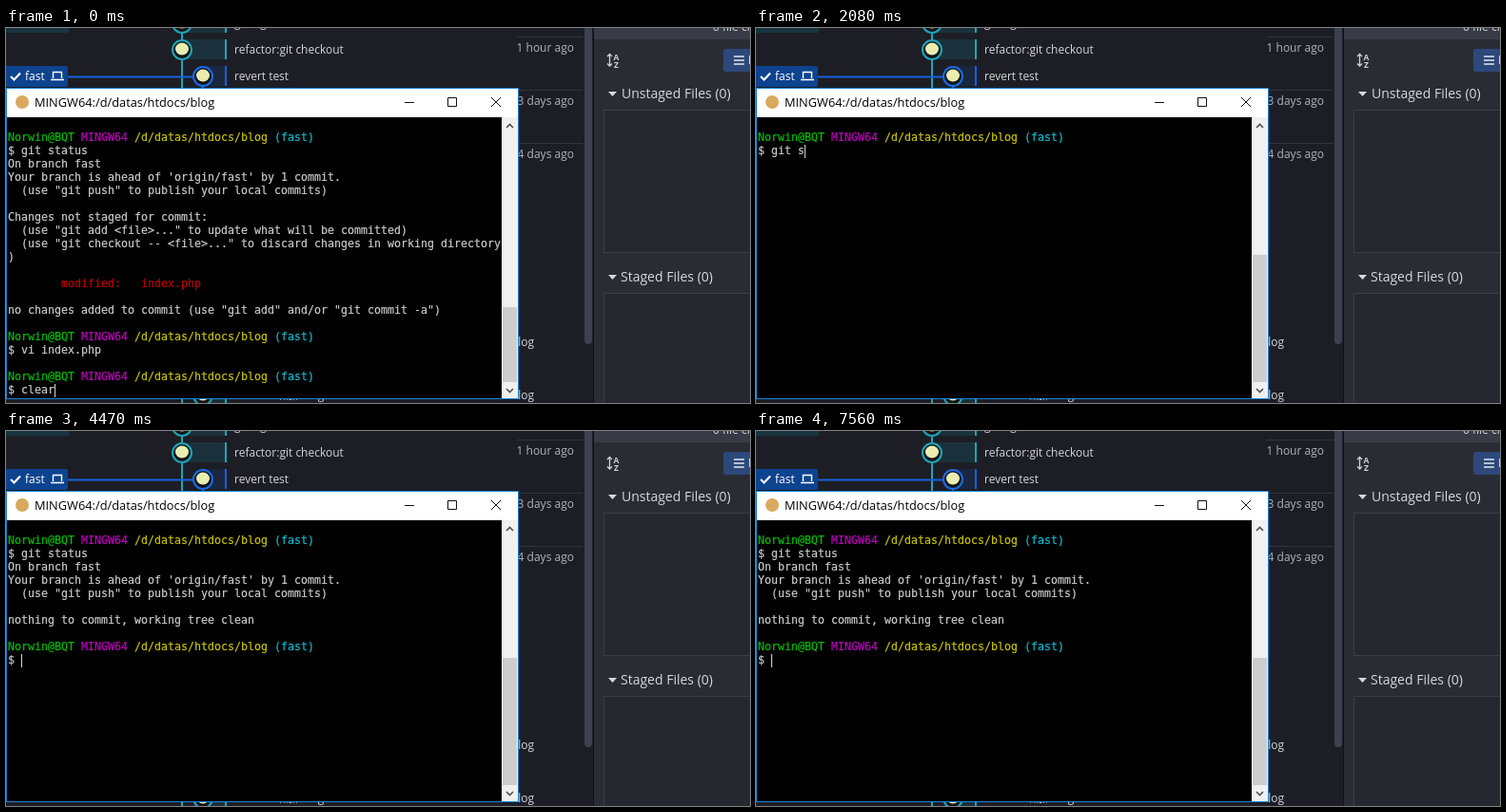
An HTML page for the animation above (7.99 s loop, 782 by 395 pixels).

```html
<!DOCTYPE html>
<html lang="en">
<head>
<meta charset="utf-8">
<title>Terminal session</title>
<style>
html, body { margin: 0; width: 100%; height: 100%; overflow: hidden; background: #1d1e25; }
#stage { position: relative; width: 782px; height: 395px; overflow: hidden; }
#stage > * { position: absolute; }
svg { left: 0; top: 0; font: 12px "Open Sans", "Noto Sans CJK SC", "Noto Sans", sans-serif; }
svg text { -webkit-text-stroke: .2px; }
#win {
  left: 0; top: 63px; width: 537px; height: 326px;
  background: #000; border: 1px solid #1883d7;
}
#term, #cursor, #thumb { z-index: 2; }
#term {
  left: 2px; top: 108px; margin: 0; white-space: pre; color: #cacaca;
  font: 11.63px/14px "DejaVu Sans Mono", monospace; -webkit-text-stroke: .2px;
}
#cursor { width: 1px; height: 14px; background: #d4d4d4; }
#thumb { left: 522px; width: 15px; background: #cdcdcd; }
.g { color: #00bf00; } .m { color: #bf00bf; } .y { color: #c8c400; }
.c { color: #10bcd2; } .r { color: #bf0000; }
</style>
</head>
<body>
<div id="stage">
  <svg id="app" width="782" height="395">
    <defs>
      <g id="node">
        <circle r="10" fill="#14161b" stroke-width="2"/>
        <ellipse cy="-1" rx="7" ry="6.500" fill="#e9edb0" stroke="none"/>
      </g>
    </defs>
    <rect width="66" height="5" fill="#17353f"/>
    <path d="M537 9.500H607M537 65.500H607M537 121.500H607" stroke="#31343d"/>
    <g fill="#1a313b">
      <path d="M185 0h46v5h-46zM185 12h46v21h-46zM207 376h24v19h-24z"/>
      <path d="M207 40h24v21h-24z" fill="#1a2740"/>
    </g>
    <g fill="none" stroke-width="2">
      <path d="M185 0V395M231 0V5M231 12V33M231 376V395" stroke="#1fa5b8"/>
      <path d="M65 51.500H207V395M231 40V61" stroke="#1462dc"/>
    </g>
    <g stroke="#1fa5b8">
      <use href="#node" x="185" y="-5"/>
      <use href="#node" x="185" y="23"/>
      <use href="#node" x="207" y="387"/>
    </g>
    <use href="#node" x="207" y="51" stroke="#1a6be6"/>
    <path d="M0 40H63q2 0 2 2V60q0 2-2 2H0z" fill="#0d438f"/>
    <g fill="none" stroke="#fff">
      <path d="M5 51l3.500 3.500L15 47.500" stroke-width="2.200"/>
      <path d="M49.500 53V46.500h9V53M47 54.500H61" stroke-width="1.400"/>
    </g>
    <text x="20" y="55" fill="#fff">fast</text>
    <g fill="#d2d5db">
      <text x="240" y="-1">git log</text>
      <text x="240" y="27">refactor:git checkout</text>
      <text x="240" y="55">revert test</text>
      <text x="283" y="391">增加 blog</text>
      <text x="555" y="335" text-anchor="end">blog</text>
      <text x="555" y="391" text-anchor="end">blog</text>
    </g>
    <g fill="#b0b3ba" text-anchor="end">
      <text x="597" y="25">1 hour ago</text>
      <text x="597" y="81">3 days ago</text>
      <text x="597" y="137">4 days ago</text>
    </g>
    <path d="M608 0h8V329a4 4 0 0 1-8 0z" fill="#3c4150"/>

    <rect x="617" width="165" height="395" fill="#2a2c34"/>
    <rect x="617" width="165" height="12" fill="#383b45"/>
    <path d="M617.500 0V395" stroke="#101116"/>
    <text x="743" y="3" fill="#d4d6dc">0 file changes</text>
    <path d="M634.500 27.500V40M632 30l2.500-2.500 2.500 2.500M632 37.500l2.500 2.500 2.500-2.500"
      fill="none" stroke="#d0d2d8" stroke-width="1.300"/>
    <g fill="#d0d2d8" font-size="8.500" font-weight="700">
      <text x="638.500" y="33.500">A</text>
      <text x="639" y="41.500">Z</text>
    </g>
    <path d="M757 22h25v24h-25q-3 0-3-3V25q0-3 3-3z" fill="#2d487b"/>
    <path d="M765 30H776M765 34H776M765 38H776" stroke="#e4e8f0" stroke-width="1.600"/>
    <text x="780" y="38" fill="#e4e8f0">Path</text>
    <g fill="#26282f" stroke="#3a3d46">
      <rect x="628.500" y="86.500" width="170" height="150"/>
      <rect x="628.500" y="279.500" width="170" height="130"/>
    </g>
    <g fill="#d6d8de" font-size="14">
      <path d="M633 67h9l-4.500 5zM633 260h9l-4.500 5z"/>
      <text x="647" y="74">Unstaged Files (0)</text>
      <text x="646" y="267">Staged Files (0)</text>
    </g>
  </svg>

  <div id="win"></div>
  <svg id="frame" width="782" height="395">
    <rect x="1" y="64" width="537" height="30" fill="#fff"/>
    <rect x="521" y="94" width="17" height="296" fill="#f0f0f0"/>
    <circle cx="17" cy="78" r="7" fill="#d9a95e"/>
    <text x="30" y="83" font-size="12.800">MINGW64:/d/datas/htdocs/blog</text>
    <g fill="none" stroke="#111">
      <path d="M419 78.500H429M464.500 73.500h9v9h-9z"/>
      <path d="M510 73l10 10M520 73l-10 10"/>
      <path d="M526 105l3.500-3.500 3.500 3.500M526 380l3.500 3.500 3.500-3.500" stroke="#505050" stroke-width="1.600"/>
    </g>
  </svg>
  <div id="thumb"></div>
  <pre id="term"></pre>
  <div id="cursor"></div>
</div>
<script>
const LOOP = 7990, CELL = 7, ROW = 14, LEFT = 2, TOP = 109, THUMB_END = 373;
const $ = id => document.getElementById(id);
const term = $('term'), cursor = $('cursor'), thumb = $('thumb');

const prompt = '<span class="g">Norwin@BQT</span> <span class="m">MINGW64</span> ' +
  '<span class="y">/d/datas/htdocs/blog</span> <span class="c">(fast)</span>';
const status = [
  prompt, '$ git status', 'On branch fast',
  "Your branch is ahead of 'origin/fast' by 1 commit.",
  '  (use "git push" to publish your local commits)', ''
];
const clean = [...status, 'nothing to commit, working tree clean'];

// Lines above the one being typed
const screens = {
  dirty: [
    ...status, 'Changes not staged for commit:',
    '  (use "git add &lt;file&gt;..." to update what will be committed)',
    '  (use "git checkout -- &lt;file&gt;..." to discard changes in working directory',
    ')', '',
    '<span class="r">        modified:   index.php</span>', '',
    'no changes added to commit (use "git add" and/or "git commit -a")', '',
    prompt, '$ vi index.php', '', prompt
  ],
  empty: [prompt],
  clean,
  ready: [...clean, '', prompt]
};

// start, screen, input line, cursor hidden
const steps = [
  [0, 'dirty', '$ clear'],
  [310, 'empty', '$ '],
  [910, 'empty', '$ g'],
  [1060, 'empty', '$ gi'],
  [1190, 'empty', '$ git '],
  [1650, 'empty', '$ git ', true],
  [2080, 'empty', '$ git s'],
  [2200, 'empty', '$ git st'],
  [2320, 'empty', '$ git sta'],
  [2470, 'empty', '$ git stat'],
  [2870, 'empty', '$ git status '],
  [3300, 'clean', ''],
  [3450, 'ready', '$ '],
  [3910, 'ready', '$ ', true],
  [4470, 'ready', '$ '],
  [4900, 'ready', '$ gi'],
  [5030, 'ready', '$ git'],
  [5560, 'ready', '$ git '],
  [5990, 'ready', '$ git ', true],
  [6550, 'ready', '$ git '],
  [7010, 'ready', '$ git'],
  [7160, 'ready', '$ gi'],
  [7280, 'ready', '$ g'],
  [7440, 'ready', '$ ']
];

let shown;
function show(step) {
  if (step === shown) return;
  shown = step;
  const [, name, input, hidden] = step;
  const lines = screens[name];
  const top = name === 'dirty' ? 294 : 239;
  term.innerHTML = [...lines, input].join('\n');
  cursor.style.left = LEFT + CELL * input.length + 'px';
  cursor.style.top = TOP + ROW * lines.length + 'px';
  cursor.style.visibility = hidden ? 'hidden' : 'visible';
  thumb.style.top = top + 'px';
  thumb.style.height = THUMB_END - top + 'px';
}

const start = performance.now();
function tick() {
  const t = (performance.now() - start) % LOOP;
  show(steps.findLast(s => s[0] <= t));
  requestAnimationFrame(tick);
}
tick();
</script>
</body>
</html>
```
